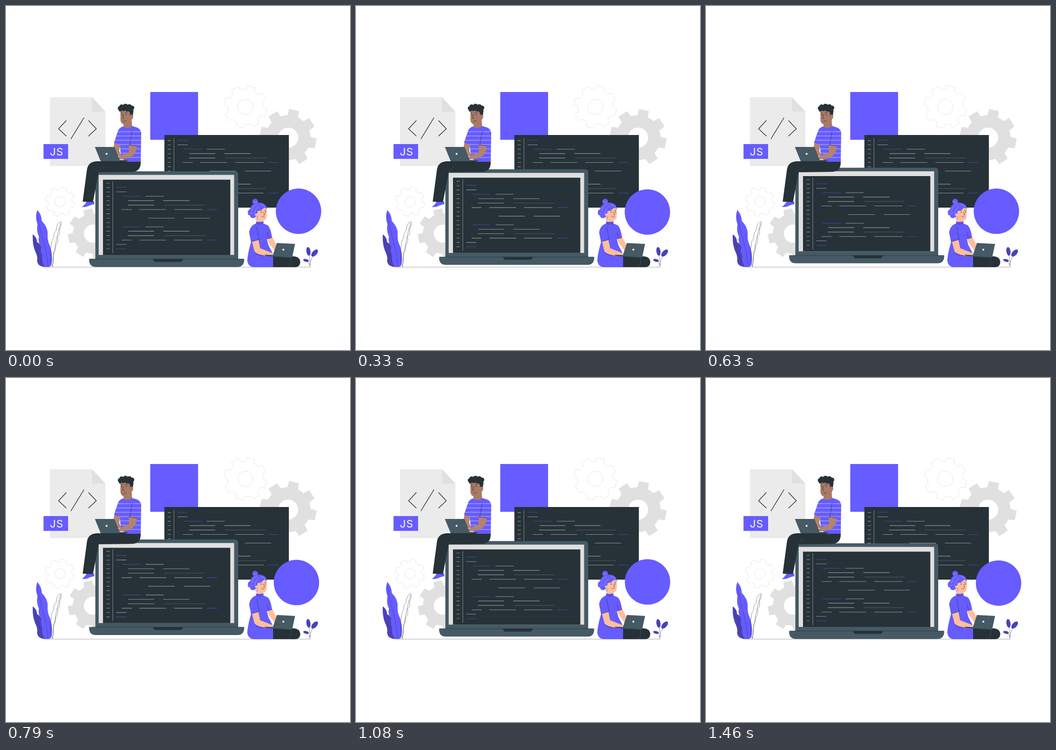
Write an HTML page that moves like this. It is 720 by 720 pixels and loops after 1500 ms.

```html
<!DOCTYPE html>
<html lang="en">
<head>
<meta charset="utf-8">
<title>Developers at work</title>
<style>
html, body { margin: 0; width: 100%; height: 100%; overflow: hidden; background: #fff; }
svg { display: block; width: 100vw; height: 100vh; }
.p { fill: #665cff; }
.d { fill: #263238; }
.s { fill: #455a64; }
.m { fill: #b4836d; }
.f { fill: #a97a66; }
.g { fill: #ffbe9d; }
.gear { fill: #e0e0e0; fill-rule: evenodd; }
.thin { fill: none; stroke: #e4e4e4; stroke-width: .9; }
.ink { fill: none; stroke: #263238; stroke-linecap: round; stroke-linejoin: round; }
.code { fill: none; stroke-width: 1.1; }
</style>
</head>
<body>
<svg viewBox="0 0 720 720">
  <defs>
    <clipPath id="window"><rect x="331.5" y="276" width="260.5" height="146"/></clipPath>
    <clipPath id="shirt"><path d="M246 252Q239 253 235 260L226 286 238 291 241 318 252 326H282L283 265Q281 255 270 253L264 251Z"/></clipPath>
    <g id="code" class="code"></g>
  </defs>

  <g id="gears"></g>

  <!-- file card -->
  <path fill="#ebebeb" d="M92 191H180L208 221V335H92Z"/>
  <path fill="#e0e0e0" d="M180 191V221H208Z"/>
  <path class="ink" stroke-width="1.4" d="M126 240L110 257 126 272M173 240L189 257 173 272M163 234L136 278"/>
  <rect class="p" x="78.5" y="289" width="51.5" height="31"/>
  <text x="106" y="313" text-anchor="middle" fill="#fff" font-size="22" letter-spacing=".8" font-family="Inter, sans-serif">JS</text>

  <rect class="p" x="302" y="180" width="100" height="100"/>

  <!-- back window -->
  <rect class="d" x="331.5" y="270" width="260.5" height="152"/>
  <g clip-path="url(#window)"><use href="#code" x="128" y="-98.5"/></g>

  <circle id="disc" class="p" cx="610" cy="429" r="47.5"/>

  <path stroke="#a3a3a3" stroke-width=".9" d="M80 546.5H638"/>

  <!-- big laptop -->
  <g id="laptop">
    <path class="s" d="M187 531V353Q187 346 194 346H479Q486 346 486 353V531Z"/>
    <rect x="194" y="353.5" width="283.5" height="167.5" fill="#e1dfdf"/>
    <rect class="d" x="203" y="363.5" width="266.5" height="157.5"/>
    <use href="#code"/>
    <path class="s" d="M174 529.5H498.5V533Q497 546 485 546H188Q175 546 174 533Z"/>
    <path stroke="#263238" stroke-width=".7" d="M175 529.5H498"/>
    <path class="d" d="M307 529.5H371L368 534Q367 535.5 364 535.5H314Q311 535.5 310 534Z"/>
  </g>

  <!-- man -->
  <path class="p" d="M159 420.5Q166 415 169 409H184.5L185 415Q177 416 173 418.5 167 421.5 159 420.5Z"/>
  <path class="d" d="M282 325H190Q172 326 169.5 342L160.5 409.5 182 410.5 194 348 266 347Q283 345 282 325Z"/>
  <path class="ink" style="stroke:#455a64" stroke-width=".6" d="M194 348Q196 340 206 338"/>
  <path class="m" d="M227 285L239 289 237 303 242 315 234 314 225 297Z"/>
  <g clip-path="url(#shirt)">
    <rect class="p" x="224" y="250" width="60" height="77"/>
    <path id="stripes" fill="none" stroke="#c3bfff" stroke-width="1"/>
  </g>
  <path class="f" d="M246 241L263 238 264 252Q256 258 246 253Z"/>
  <path class="m" d="M257 291L274 293Q273 309 263 315 252 321 237 321L232 318 244 311.5 257 306Z"/>
  <path class="ink" stroke-width=".7" d="M264 262L259 291M274 293L257 290.5"/>
  <path class="f" d="M239.5 218V239Q241 248 249 248L258 246 266 234V218L256 213Z"/>
  <path class="d" d="M256 218L267 218 265 233 260 229 259 222Z"/>
  <g id="curls" class="d"></g>
  <circle class="f" cx="263" cy="230.5" r="3.3"/>
  <path class="ink" stroke-width=".8" d="M240.5 223.5L243.5 222.5M249 223L254 223.5M246 227L244 235 246.5 235.5M246 241.5Q250 242 252 239.5"/>
  <circle class="d" cx="242.5" cy="227" r="1"/><circle class="d" cx="251.5" cy="227" r="1"/>
  <path fill="#37474f" d="M198 322L254 322.5 255 325H199Z"/>
  <path class="s" d="M186 295H227L239 324.5H198Z"/>
  <circle cx="210.5" cy="309.5" r="2" fill="#fff"/>

  <!-- woman -->
  <path class="g" d="M546 486L557 483 566 500 562 512 550 496Z"/>
  <path class="p" d="M524 455Q511 459 509 474L513 494Q506 517 505 533 507 546 518 546.5H560V521L549 500 546 488 557 485Q554 465 548 459L538 455Z"/>
  <path class="g" d="M514 490L528 488 532 507 560 518 564 523H546Q524 520 520 513Z"/>
  <path class="p" d="M509 474Q511 461 521 459L527 472 530 489 513 494Z"/>
  <path class="ink" stroke-width=".6" d="M525 463Q527 475 530 488.500L514 493.5M522 517Q528 523 540 523M547 474L549 485M548 487L556 484.5"/>
  <path class="g" d="M524 438L537 445 538 455H524Z"/>
  <path class="p" d="M523.5 451Q531 453 539 450.5V457Q531 460 523 457Z"/>
  <path stroke="#332e80" stroke-width=".7" d="M526 452V457M529 452.5V458M532 452.5V458M535 452V457"/>
  <path class="g" d="M524 420H545Q547 434 545 444 542 450 536 449.5 525 447 521 436Z"/>
  <circle class="p" cx="521.5" cy="409.5" r="6"/>
  <path class="p" d="M546.5 425Q545 413 531 411.5 514 411 511 425 505 428 506.5 434 506 438 511 438.5 511 444 518 444L523 441Q527 437 526 430L534 427 541 422Z"/>
  <path fill="none" stroke="#aaa5ff" stroke-width=".8" d="M518 408Q521 413 525 410M514 430Q515 419 525 415M520 435Q521 425 530 419M533 415Q540 417 543 421M510 434Q514 436 517 432"/>
  <circle cx="524" cy="437" r="2.8" class="g"/>
  <path fill="none" stroke="#665cff" stroke-width=".8" d="M523.5 440a2.5 3 0 1 0 1 0"/>
  <circle class="d" cx="534" cy="431.5" r=".9"/><circle class="d" cx="543" cy="431" r=".9"/>
  <path class="ink" stroke-width=".7" d="M532 428.5L535 427.5M541 427.5L544 427.5M539 431L541.5 437 539 437.5M535 440.5Q538 443 541 440"/>
  <path class="d" d="M559 524H603Q615 525 616 536 615 546.5 606 546.5H559Z"/>
  <path class="ink" style="stroke:#455a64" stroke-width=".7" d="M592 546Q597 540 596 528"/>
  <path fill="#37474f" d="M541 520.5L560 521.5 598 525 598 527 560 524.5 543 522.5Z"/>
  <path class="s" d="M567 496L605 498 599 526 558 523.5Z"/>
  <circle cx="580.5" cy="510" r="2" fill="#fff"/>

  <!-- plants -->
  <path fill="#4a42b8" d="M56 478Q65 484 65 494 76 500 76 514L86 546H78Q66 544 65 533 67 525 61 513 55 499 56 478Z"/>
  <path class="p" d="M65.5 427Q74 435 75 450 89 464 87 481 87 493 92 502 98 520 96 536 95 546 89 546H80Q74 535 76 523 71 514 74 504 66 494 69 483 63 470 66 457 60 442 65.5 427Z"/>
  <path fill="none" stroke="#3d3699" stroke-width=".6" d="M66 436Q72 475 79 494 86 520 88 545M60 492Q69 525 80 545"/>
  <path class="ink" stroke-width=".5" d="M97 545Q91 535 94 525 90 514 95 503 94 493 100 485 99 475 105 470 105 455 115 451 117 460 112 467 114 478 108 483 110 495 104 501 105 511 99 517 101 530 97 545M114 455Q101 500 97 545"/>
  <path class="ink" stroke-width=".5" d="M636 545Q637 530 633 518M636 543Q637 530 645 519M636 543Q635 537 628 533"/>
  <g fill="#4a42b8">
    <ellipse cx="633" cy="513.5" rx="4.3" ry="9" transform="rotate(-8 633 513.5)"/>
    <ellipse cx="646" cy="517" rx="4.8" ry="9" transform="rotate(42 646 517)"/>
    <ellipse cx="628" cy="532.5" rx="6" ry="2.9" transform="rotate(14 628 532.5)"/>
  </g>
</svg>
<script>
const NS = 'http://www.w3.org/2000/svg';
const $ = id => document.getElementById(id);

function add(parent, tag, attrs) {
  const el = document.createElementNS(NS, tag);
  for (const k in attrs) el.setAttribute(k, attrs[k]);
  $(parent).appendChild(el);
}

// Eight-toothed gear with a round hole
function gear(cx, cy, outer, root, hole, turn, cls) {
  const at = (r, deg) => {
    const a = deg * Math.PI / 180;
    return (cx + r * Math.cos(a)).toFixed(1) + ' ' + (cy + r * Math.sin(a)).toFixed(1);
  };
  let d = '';
  for (let i = 0; i < 8; i++) {
    const a = turn + i * 45;
    d += (i ? `A${root} ${root} 0 0 1 ` : 'M') + at(root, a - 14) +
      'L' + at(outer, a - 10) + 'L' + at(outer, a + 10) + 'L' + at(root, a + 14);
  }
  d += `A${root} ${root} 0 0 1 ${at(root, turn - 14)}Z` +
    `M${cx - hole} ${cy}a${hole} ${hole} 0 1 0 ${2 * hole} 0a${hole} ${hole} 0 1 0 ${-2 * hole} 0Z`;
  add('gears', 'path', { d, class: cls });
}
gear(590.5, 275.5, 60, 47, 21, -78, 'gear');
gear(182, 476.5, 53, 42, 19, -102, 'gear');
gear(501, 211, 45, 37, 16, -75, 'thin');
gear(113, 409.5, 31, 25, 11, -75, 'thin');

// Lines of code, grouped by colour
const ink = { grey: '', dim: '', violet: '' };
const seg = (kind, y, ...xs) => {
  for (let i = 0; i < xs.length; i += 2) ink[kind] += `M${xs[i]} ${y}H${xs[i + 1]}`;
};
function block(y) {
  seg('violet', y, 244, 282);
  seg('grey', y, 292, 330);
  seg('grey', y + 9.2, 256, 310, 329, 384);
  seg('grey', y + 18.4, 255, 310);
  seg('dim', y + 18.4, 331, 416);
  seg('grey', y + 27.8, 242, 263, 279, 335, 352, 411);
  seg('violet', y + 27.8, 421, 442);
}
seg('violet', 379.5, 231, 252);
seg('grey', 389, 231, 252);
block(398.2);
seg('grey', 444, 298, 353, 372, 427);
block(462.2);
seg('grey', 499, 231, 252);
seg('violet', 508.2, 231, 252);
for (let i = 0; i < 16; i++) seg('grey', (371 + i * 9.13).toFixed(1), 210.5, 217);
add('code', 'path', { d: ink.grey, stroke: '#89949a' });
add('code', 'path', { d: ink.dim, stroke: '#46545c' });
add('code', 'path', { d: ink.violet, stroke: '#4a44a8' });
add('code', 'path', { d: 'M223.5 367V517', stroke: '#78848a' });

let stripes = '';
for (let y = 263; y < 326; y += 9) stripes += `M224 ${y}H284`;
$('stripes').setAttribute('d', stripes);

for (const [cx, cy, r] of [[238, 214, 4], [242, 211, 5], [250, 210, 5.5], [258, 211, 5.5],
  [264, 213, 4.5], [246, 215, 5], [254, 216, 5], [261, 218, 5], [239, 218, 3]])
  add('curls', 'circle', { cx, cy, r });

// Motion: the laptop bobs, the disc circles; both advance 24 times a second
const LOOP = 1500, STEP = LOOP / 36;
const bob = [[0, 0], [210, -2.5], [500, -6.4], [750, -8.6], [1080, -4.8], [1330, -1.4], [1460, 0], [1500, 0]];

function lift(t) {
  const i = bob.findIndex(k => k[0] > t);
  const [t0, y0] = bob[i - 1], [t1, y1] = bob[i];
  return y0 + (y1 - y0) * (t - t0) / (t1 - t0);
}

const start = performance.now();
function draw(now) {
  const t = Math.floor(((Math.max(0, now - start) % LOOP) + 5) / STEP) % 36 * STEP;
  const a = 0.24 + t / LOOP * 2 * Math.PI;
  $('laptop').setAttribute('transform', `translate(0 ${lift(t).toFixed(2)})`);
  $('disc').setAttribute('transform',
    `translate(${(2.3 * Math.cos(a)).toFixed(2)} ${(2.2 * Math.sin(a)).toFixed(2)})`);
  requestAnimationFrame(draw);
}
draw(start);
</script>
</body>
</html>
```
